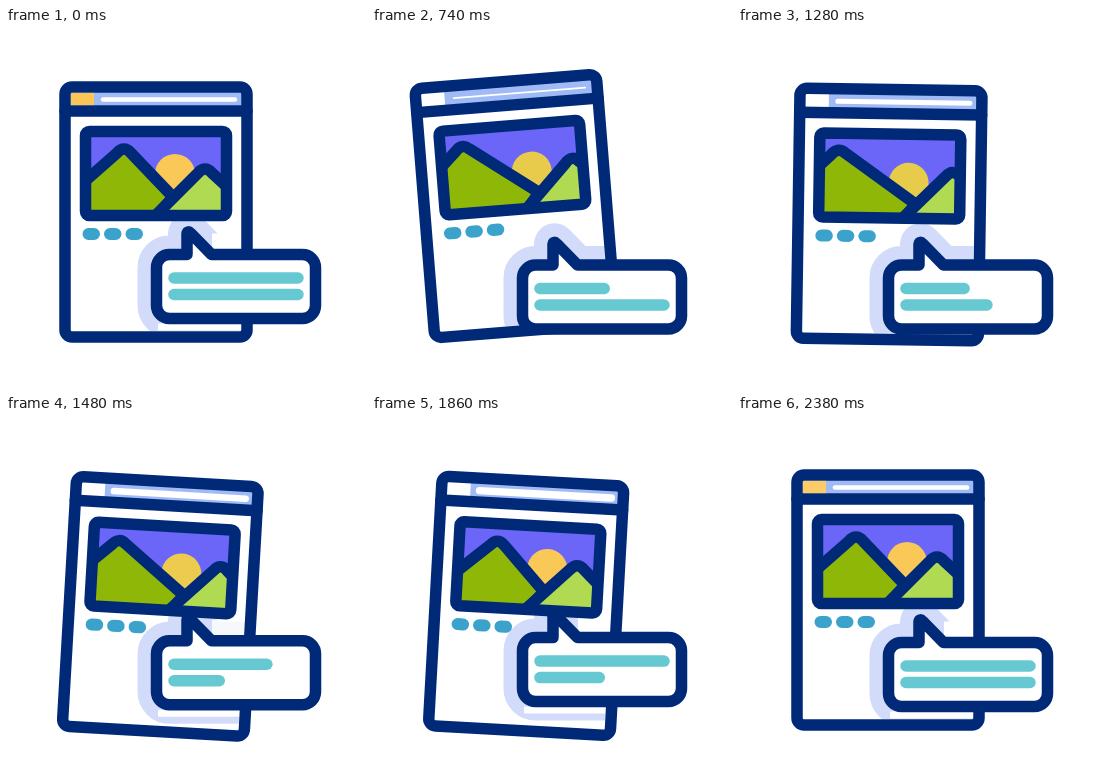
Animation of 360 by 360 pixels, one loop 2.4 s. Source, as an HTML page:

```html
<!DOCTYPE html>
<html lang="en">
<head>
<meta charset="utf-8">
<title>Page with comment</title>
<style>
  html, body { margin: 0; width: 100%; height: 100%; overflow: hidden; background: #fff; }
  svg { display: block; width: 100vw; height: 100vh; }
  .ink { stroke: #002a78; stroke-width: 11.5; stroke-linejoin: round; stroke-linecap: round; }
  .text { stroke: #66c9d1; stroke-width: 11.5; stroke-linecap: round; }
</style>
</head>
<body>
<svg viewBox="0 0 360 360" fill="none">
  <defs>
    <clipPath id="paper"><rect class="tilt" x="65" y="89" width="170" height="214"/></clipPath>
    <clipPath id="photo"><rect x="79.5" y="103.5" width="141" height="84"/></clipPath>
    <path id="balloon" d="M163.500 226.500H181V206Q181.500 202 185 205.500L205.500 226.500H296.500a13 13 0 0 1 13 13V277.500a13 13 0 0 1-13 13H163.500a13 13 0 0 1-13-13V239.500a13 13 0 0 1 13-13Z"/>
  </defs>

  <g class="tilt">
    <rect x="59" y="59" width="182" height="250" rx="7" fill="#fff"/>
    <rect x="88" y="64" width="148" height="14" fill="#a0baf6"/>
    <rect id="tab" x="65" y="65" width="23" height="12" fill="#fbc657"/>
    <path id="shine" d="M97 71.500H229" stroke="#fff" stroke-linecap="round"/>
  </g>

  <g clip-path="url(#paper)">
    <g class="bob">
      <use href="#balloon" stroke="#d2dcfa" stroke-width="38" stroke-linejoin="round"/>
      <path d="M152 299H240" stroke="#fff" stroke-width="7"/>
      <path id="gap" d="M206 213.500H240" stroke="#fff" stroke-width="16"/>
    </g>
  </g>

  <g class="tilt">
    <rect class="ink" x="59" y="59" width="182" height="250" rx="7"/>
    <path class="ink" d="M59 83H241"/>
    <g clip-path="url(#photo)">
      <path d="M79 103H221V188H79Z" fill="#6b66f8"/>
      <circle cx="169" cy="146" r="20" fill="#f9c856" id="sun"/>
      <path id="hillA" class="ink" fill="#8fb708"/>
      <path id="hillB" class="ink" fill="#b0da52"/>
    </g>
    <rect class="ink" x="79.5" y="103.5" width="141" height="84" rx="4"/>
    <path d="M82.500 206H88M104 206H109.500M125.500 206H131" stroke="#3ba2cc" stroke-width="12" stroke-linecap="round"/>
  </g>

  <g class="bob">
    <use href="#balloon" class="ink" fill="#fff"/>
    <path id="lineA" class="text"/>
    <path id="lineB" class="text"/>
  </g>
</svg>
<script>
const LOOP = 2400;

const $ = id => document.getElementById(id);
const all = cls => [...document.querySelectorAll("." + cls)];
const tilts = all("tilt"), bobs = all("bob");

const linear = x => x;
const smooth = x => x * x * (3 - 2 * x);
const easeOut = x => x * (2 - x);

const ramp = (t, from, to) => Math.min(1, Math.max(0, (t - from) / (to - from)));

// Rises 0 to 1 between a and b, holds, and falls back between c and d.
const pulse = (t, a, b, c, d, ease = linear) =>
  t < c ? ease(ramp(t, a, b)) : ease(1 - ramp(t, c, d));

function drawHills(m) {
  const p = 118 - 20 * m, q = 199 + 14 * m;
  const slope = 1 - 0.33 * m;
  $("hillA").setAttribute("d",
    `M70 ${161 - 16 * m}L${p - 7} 125Q${p} 117 ${p + 7} ${119 + 6 * slope}` +
    `L${167 + 9 * m} ${169 + 4 * m}L${149 + 14 * m} 190H70Z`);
  $("hillB").setAttribute("d",
    `M${146 + 14 * m} 191L${q - 7} 145Q${q} 137 ${q + 7} 145L${q + 32} 168V191Z`);
}

function drawSun(m) {
  $("sun").setAttribute("cy", 146 + 6 * m);
  $("sun").setAttribute("fill", `rgb(${249 - 19 * m} ${200 + 4 * m} ${86 - 12 * m})`);
}

function drawLine(id, y, shrink) {
  $(id).setAttribute("d", `M168 ${y}H${292 - 100 * shrink}`);
}

function draw(t) {
  const turn = 2 * Math.PI * t / LOOP;
  const angle = 5 * (pulse(t, 1210, 1620, 1620, 2280) - pulse(t, 100, 800, 800, 1210));
  const sink = 1.2 * Math.sin(turn / 2);
  const bob = 10.5 * pulse(t, 200, 760, 1280, 1430, smooth)
            - 11.7 * pulse(t, 1430, 1640, 1640, 2040, smooth);
  const shift = pulse(t, 0, 1280, 1280, 1620, easeOut);

  for (const el of tilts) el.setAttribute("transform", `translate(0 ${sink}) rotate(${angle} 60 262)`);
  for (const el of bobs) el.setAttribute("transform", `translate(0 ${bob})`);
  drawHills(shift);
  drawSun(shift);
  drawLine("lineA", 250, pulse(t, 230, 1085, 1085, 1660));
  drawLine("lineB", 266.5, pulse(t, 1040, 1600, 1600, 2340));
  $("shine").setAttribute("stroke-width", 4.5 - 3 * Math.sin(turn));
  $("tab").style.opacity = 1 - pulse(t, 0, 200, 2200, 2400);
  $("gap").style.opacity = 1 - pulse(t, 200, 300, 1400, 1500);
}

const start = performance.now();
function tick() {
  draw((performance.now() - start) % LOOP);
  requestAnimationFrame(tick);
}
tick();
</script>
</body>
</html>
```
